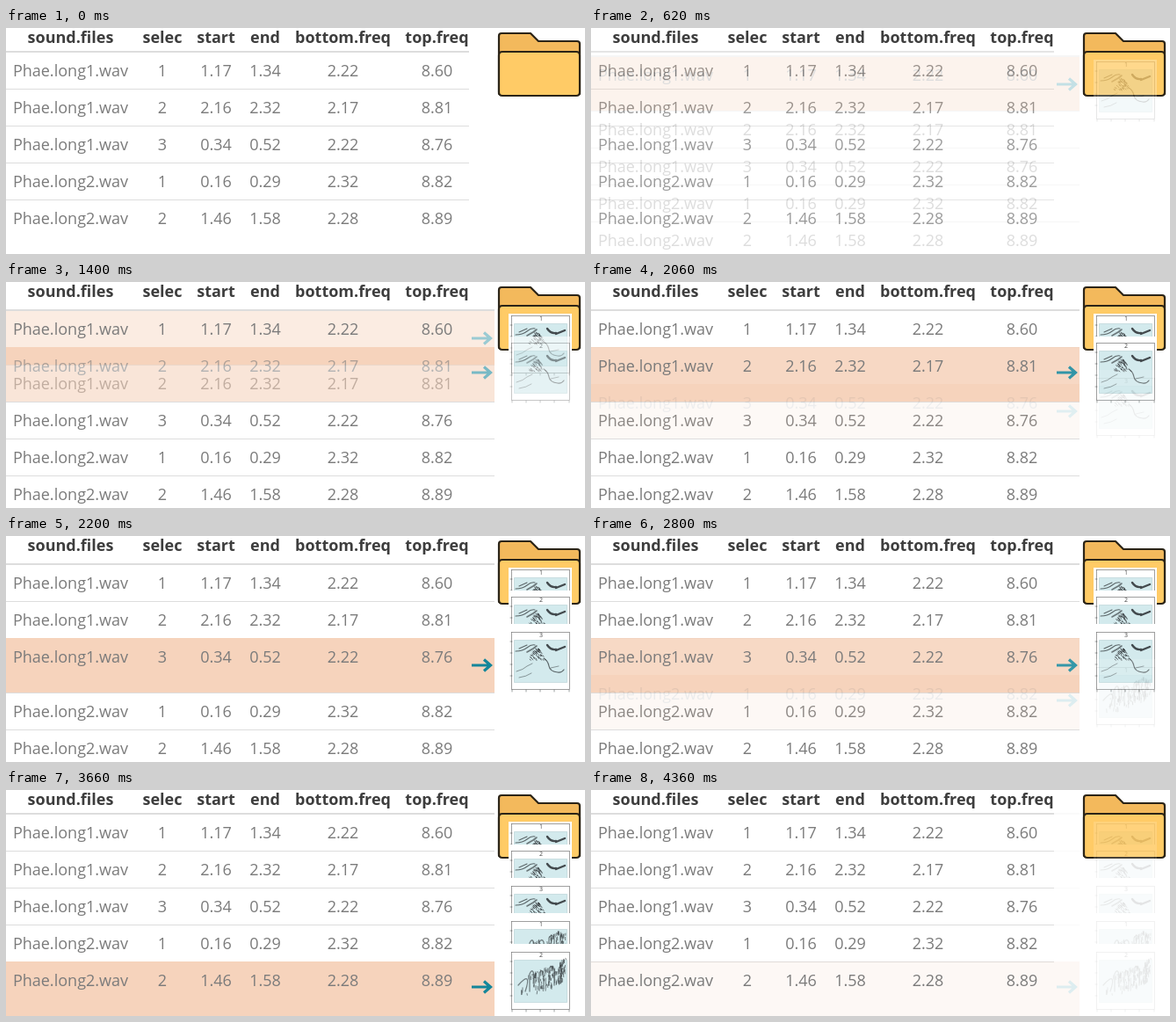
An HTML page that plays this animation: 659 px wide and 257 px high, repeating every 4380 ms.

```html
<!DOCTYPE html>
<html lang="en">
<head>
<meta charset="utf-8">
<title>Selection table to spectrogram files</title>
<style>
  html, body { margin: 0; width: 100%; height: 100%; overflow: hidden; background: #fff; }
  svg { display: block; }
  text { font: 18px "Open Sans", sans-serif; fill: #7b7b7b; text-anchor: middle; }
  .head { font-weight: 700; fill: #3d3d3d; }
  .label { font-size: 7px; fill: #444; }
  .ink { fill: none; stroke: #33393c; stroke-linecap: round; stroke-linejoin: round; }
</style>
</head>
<body>
<svg id="stage" width="659" height="257" viewBox="0 0 659 257"></svg>
<script>
const columns = [73.5, 178, 239, 295, 383.5, 490.5];
const header = ["sound.files", "selec", "start", "end", "bottom.freq", "top.freq"];
const rows = [
  ["Phae.long1.wav", "1", "1.17", "1.34", "2.22", "8.60"],
  ["Phae.long1.wav", "2", "2.16", "2.32", "2.17", "8.81"],
  ["Phae.long1.wav", "3", "0.34", "0.52", "2.22", "8.76"],
  ["Phae.long2.wav", "1", "0.16", "0.29", "2.32", "8.82"],
  ["Phae.long2.wav", "2", "1.46", "1.58", "2.28", "8.89"]
];
const arrowY = [64, 103, 147, 187, 224];
const plotY = [37, 68, 108, 148, 183];
const paperY = [36, 62, 100, 140, 175];

const rect = (x, y, w, h, fill, extra = "") =>
  `<rect x="${x}" y="${y}" width="${w}" height="${h}" fill="${fill}" ${extra}/>`;
const ink = (d, width, opacity = 1) =>
  `<path class="ink" d="${d}" stroke-width="${width}" opacity="${opacity}"/>`;
const textRow = (cells, y, cls = "") =>
  cells.map((cell, i) => `<text class="${cls}" x="${columns[i]}" y="${y}">${cell}</text>`).join("");

function randomFrom(seed) {
  return () => (seed = (seed * 16807) % 2147483647) / 2147483647;
}

const folder = `<g stroke="#2b2417" stroke-width="2.2" stroke-linejoin="round">
  <path fill="#f3b95c" d="M561 75V9q0-3 3-3h33l9 9h44q3 0 3 3v57z"/>
  <path fill="#ffcb66" d="M561 31q0-4 4-4h84q4 0 4 4v42q0 4-4 4h-84q-4 0-4-4z"/></g>`;

// Whistled notes: a few contours plus a grainy centre.
function whistle(seed) {
  const random = randomFrom(seed);
  let grain = "";
  for (let i = 0; i < 60; i++) {
    const y = random() * 13, x = 32 + (random() - .5) * (5 + y * 1.2);
    grain += `M${x.toFixed(1)} ${(20 + y).toFixed(1)}l1 1.2`;
  }
  return ink("M8 23Q16 23 21 19T30 16M12 20l9-4", 1.1, .75)
    + ink("M21 24l7-4 4-3", 1.6, .65)
    + ink("M44 16q4 6 10 5M54 22l10-4", 2.4, .9)
    + ink("M40 31q5 3 6 9t10 7q4 1 7-3", 1.2, .75)
    + ink("M9 46q8-2 12-6l6-3M12 53q8-1 14-5M48 42l9-2", .9, .55)
    + ink(grain, 1, .75);
}

// Broadband calls: clustered vertical streaks, heavier on the right.
function chatter(seed) {
  const random = randomFrom(seed);
  let streaks = "";
  for (let i = 0; i < 125; i++) {
    const u = Math.sqrt(random()), x = 11 + u * 54;
    const y = 32 - u * 24 + random() * 24;
    streaks += `M${x.toFixed(1)} ${y.toFixed(1)}l${(random() - .5).toFixed(1)} ${(1 + random() * 5).toFixed(1)}`;
  }
  return ink(streaks, 1, .6)
    + ink("M11 39q8-9 10-7t-2 14M24 46V26q3-7 5 1v14M35 45V25q3-5 5 0v18M46 39V20q4-6 6 2v17M59 37V17", 1.3, .6);
}

function spectrogram(i) {
  const call = i < 3 ? whistle(71 + i * 19) : chatter(503 + i * 37);
  return rect(572, paperY[i], 72, plotY[i] + 71 - paperY[i], "#fff")
    + `<g transform="translate(572 ${plotY[i]})">`
    + rect(3.5, 1.5, 66, 65, "none", 'stroke="#777" stroke-width=".7"')
    + rect(6.5, 10.5, 60, 48, "#d3eaed", 'stroke="#7fa9b0" stroke-width=".6" stroke-dasharray="1 1"')
    + ink("M2 12h2M2 25h2M2 38h2M2 51h2M4 67v2M20 67v2M36 67v2M52 67v2M69 67v2", .7, .7)
    + call + `<text class="label" x="37" y="7">${rows[i][1]}</text></g>`;
}

// Step 0 is the plain table; step n has row n highlighted and n spectrograms.
function scene(step) {
  const active = step - 1;
  const width = step ? 556 : 527;
  const top = step % 5 ? 32 : 27;
  let out = rect(0, 0, 659, 257, "#fff") + textRow(header, 17, "head");
  let body = "";
  rows.forEach((cells, i) => {
    const y = top + 42 * i + (step && i > active ? 20 : 0);
    if (i) out += rect(0, y, width, 1, "#dddddd");
    if (i === active) out += rect(0, y, width, 62, "#f6d3bc");
    body += textRow(cells, y + 28);
  });
  out += rect(0, top - 1, width, 2, "#dddddd") + body + folder;
  for (let i = 0; i < step; i++) out += spectrogram(i);
  if (step) {
    out += `<path d="M530 ${arrowY[active]}h21m-7-6.5l7.5 6.5-7.5 6.5" fill="none" stroke="#14869a" stroke-width="3.2"/>`;
  }
  return `<g>${out}</g>`;
}

const stage = document.getElementById("stage");
stage.innerHTML = [0, 1, 2, 3, 4, 5].map(scene).join("");
const layers = [...stage.children];

const LOOP = 4380, TICK = 20;
const fadeStarts = [600, 1340, 2060, 2800, 3520, 4260];
const fadeSteps = [8, 7, 8, 7, 8, 7];

function draw(t) {
  const from = fadeStarts.filter(start => t >= start).length - 1;
  const p = from < 0 ? 0
    : Math.min(1, (Math.floor((t - fadeStarts[from]) / TICK) + 1) / fadeSteps[from]);
  layers.forEach((layer, i) => {
    let opacity = 0;
    if (i === 0) opacity = 1;
    else if (i === from) opacity = from === 5 ? 1 - p : 1;
    else if (i === from + 1 && from >= 0) opacity = p;
    layer.style.opacity = opacity;
    layer.style.display = opacity ? "" : "none";
  });
}

const began = performance.now();
function frame() {
  draw((performance.now() - began) % LOOP);
  requestAnimationFrame(frame);
}
frame();
</script>
</body>
</html>
```
